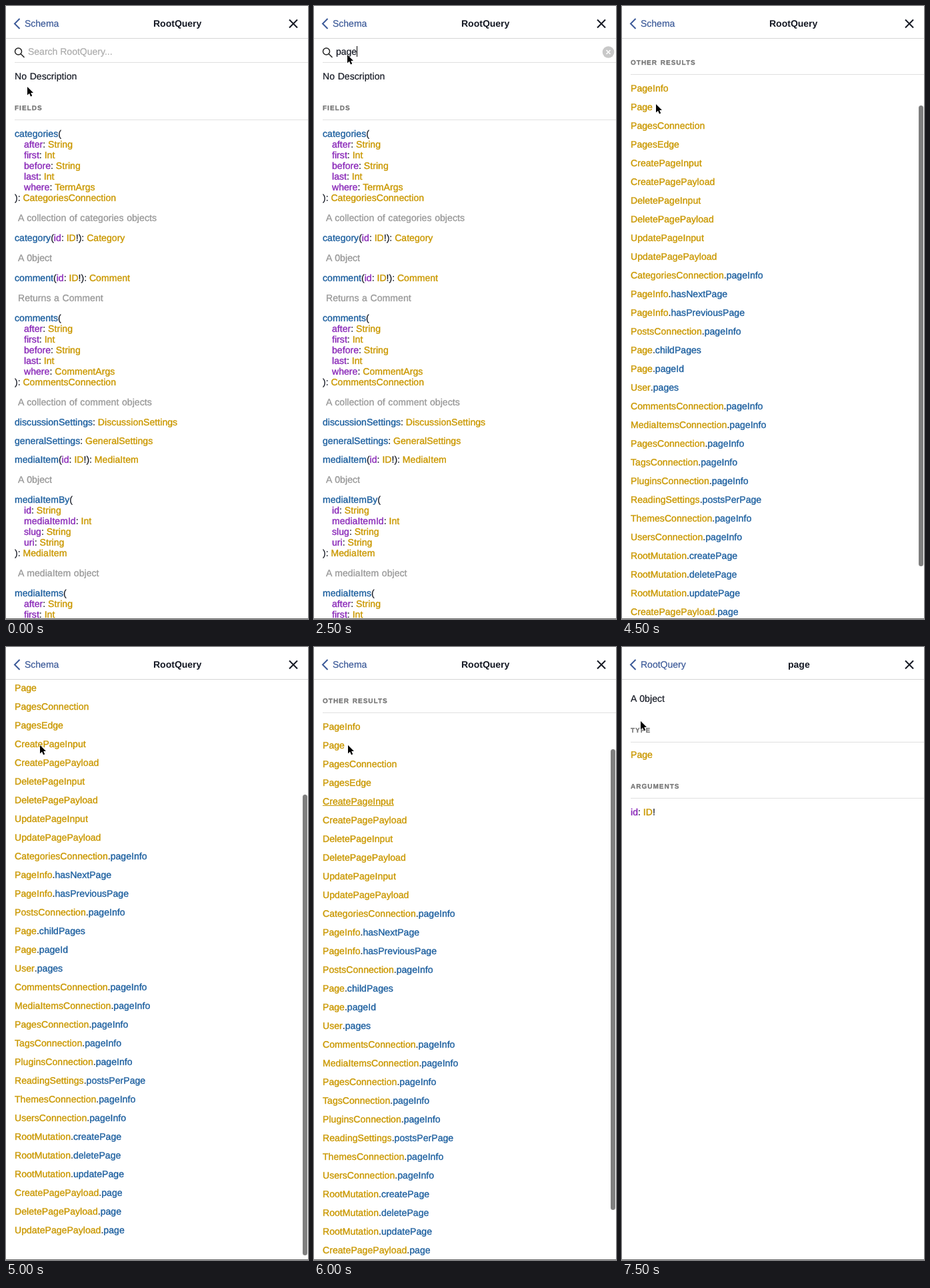
Write an HTML page that moves like this. It is 453 px wide and 918 px high and loops after 8000 ms.

```html
<!DOCTYPE html>
<html>
<head>
<meta charset="utf-8">
<style>
  html, body { margin: 0; width: 100%; height: 100%; overflow: hidden; background: #fff; }
  body { position: relative; color: #141823; font: 14px/16px "Liberation Sans", Arial, sans-serif; text-rendering: geometricPrecision; -webkit-text-stroke: .2px; }
  div, svg { position: absolute; white-space: pre; }
  svg { left: 0; top: 0; fill: none; stroke-width: 2; overflow: visible; }
  span { letter-spacing: .06px; -webkit-text-stroke: .4px; }
  .field { color: #1f61a0; }
  .arg { color: #8b2bb9; }
  .type { color: #ca9800; }
  .text { letter-spacing: .06px; word-spacing: .7px; }
  .note { color: #999; -webkit-text-stroke: .35px; }
  .head { color: #777; font: bold 10px/17px "Liberation Sans", Arial, sans-serif; letter-spacing: 1px; word-spacing: 1px; -webkit-text-stroke: .3px; }
  .rule { left: 13px; right: 0; height: 1px; background: #e0e0e0; }
  #view { inset: 0; clip-path: inset(49px 0 1px 0); }
  #content, #content > div { left: 0; top: 0; width: 100%; }
  #back { left: 28px; top: 18px; color: #3b5998; }
  #title { top: 18px; font-weight: bold; -webkit-text-stroke: 0; }
  #input { left: 33px; top: 60px; }
  #caret { top: 60px; width: 1px; height: 16px; background: #000; }
  #bar { left: 445px; width: 7px; height: 690px; border-radius: 4px; background: rgba(0, 0, 0, .5); }
</style>
</head>
<body>
<div id="view">
  <div id="content">
    <div id="search">
      <svg width="453" height="90">
        <g stroke="#222" stroke-width="1.5"><circle cx="18.5" cy="68" r="5"/><path d="M22 71.5L27.5 77"/></g>
        <g id="clear"><circle cx="441.5" cy="69" r="8.8" fill="#c8c8c8"/><path d="M438.5 66l6 6m0-6l-6 6" stroke="#fff" stroke-width="1.5"/></g>
      </svg>
      <div id="input"></div>
      <div id="caret"></div>
      <div class="rule" style="top:84px"></div>
    </div>
    <div id="fields"></div>
    <div id="results"></div>
    <div id="detail"></div>
  </div>
  <div id="bar"></div>
</div>
<div id="back"></div>
<div id="title"></div>
<div class="rule" style="left:0;top:48px;background:#d6d6d6"></div>
<div class="rule" style="left:0;top:917px;background:#666"></div>
<svg width="453" height="50">
  <path d="M20.5 19L13 26.5L20.5 34" stroke="#3b5998"/>
  <path d="M425 20.5l12 12m0-12l-12 12" stroke="#141823"/>
</svg>
<svg id="mouse" width="12" height="18"><path d="M0 0V12.5L3 9.8L5 14.5L7.2 13.5L5.2 9H9Z" fill="#000" stroke="#fff" stroke-width="1" paint-order="stroke"/></svg>
<script>
const $ = id => document.getElementById(id);
const span = cls => s => `<span class="${cls}">${s}</span>`;
const field = span('field'), arg = span('arg'), type = span('type');
const typed = s => s.replace(/(\w+): (\w+)/, (_, name, kind) => arg(name) + ': ' + type(kind));

function row(page, y, html, x = 13, cls = '') {
  $(page).insertAdjacentHTML('beforeend', `<div class="${cls}" style="left:${x}px;top:${y - 8}px">${html}</div>`);
  return $(page).lastChild;
}
function heading(page, y, label) {
  row(page, y, label, 13, 'head');
  row(page, y + 25, '', 13, 'rule');
}

// Each entry: name, arguments, type, description
const paging = 'after: String,first: Int,before: String,last: Int';
const schema = [
  ['categories', paging + ',where: TermArgs', 'CategoriesConnection', 'A collection of categories objects'],
  ['category', 'id: ID!', 'Category', 'A 0bject'],
  ['comment', 'id: ID!', 'Comment', 'Returns a Comment'],
  ['comments', paging + ',where: CommentArgs', 'CommentsConnection', 'A collection of comment objects'],
  ['discussionSettings', '', 'DiscussionSettings'],
  ['generalSettings', '', 'GeneralSettings'],
  ['mediaItem', 'id: ID!', 'MediaItem', 'A 0bject'],
  ['mediaItemBy', 'id: String,mediaItemId: Int,slug: String,uri: String', 'MediaItem', 'A mediaItem object'],
  ['mediaItems', paging, 'MediaItemsConnection']
];
row('fields', 105, 'No Description', 13, 'text');
heading('fields', 153, 'FIELDS');
let y = 191;
for (const [name, args, kind, note] of schema) {
  const list = args ? args.split(',') : [];
  if (list.length > 1) {
    row('fields', y, field(name) + '(');
    for (const a of list) row('fields', y += 16, typed(a), 27);
    row('fields', y += 16, '): ' + type(kind));
  } else {
    row('fields', y, field(name) + (args && `(${typed(args)})`) + ': ' + type(kind));
  }
  if (note) row('fields', y += 30, note, 18, 'text note');
  y += note ? 30 : 28;
}

const [pageLink] = ['page', 'pageBy', 'pages'].map((s, i) => row('results', 105 + 28 * i, field(s)));
heading('results', 209, 'OTHER RESULTS');
const matches = ('PageInfo Page PagesConnection PagesEdge CreatePageInput CreatePagePayload DeletePageInput ' +
  'DeletePagePayload UpdatePageInput UpdatePagePayload CategoriesConnection.pageInfo PageInfo.hasNextPage ' +
  'PageInfo.hasPreviousPage PostsConnection.pageInfo Page.childPages Page.pageId User.pages ' +
  'CommentsConnection.pageInfo MediaItemsConnection.pageInfo PagesConnection.pageInfo TagsConnection.pageInfo ' +
  'PluginsConnection.pageInfo ReadingSettings.postsPerPage ThemesConnection.pageInfo UsersConnection.pageInfo ' +
  'RootMutation.createPage RootMutation.deletePage RootMutation.updatePage CreatePagePayload.page ' +
  'DeletePagePayload.page UpdatePagePayload.page').split(' ').map((s, i) => {
    const [kind, name] = s.split('.');
    return row('results', 247 + 28 * i, type(kind) + (name ? '.' + field(name) : ''));
  });
const inputLink = matches[4];

row('detail', 77, 'A 0bject', 13, 'text');
heading('detail', 125, 'TYPE');
row('detail', 161, type('Page'));
heading('detail', 209, 'ARGUMENTS');
row('detail', 247, typed('id: ID!'));

// Linear interpolation through [time, value] points
function track(t, points) {
  let i = 1;
  while (i < points.length - 1 && t > points[i][0]) i++;
  const [t0, a] = points[i - 1], [t1, b] = points[i];
  return a + (b - a) * Math.min(1, Math.max(0, (t - t0) / (t1 - t0)));
}
const mouseX = [[0, 32], [1000, 50], [3500, 50], [4000, 51], [6750, 51], [7250, 28]];
const mouseY = [[0, 121], [1000, 73], [3500, 73], [4000, 147], [6750, 147], [7250, 111]];
const scroll = [[4000, 0], [4500, 124], [5000, 214], [5500, 214], [6000, 128], [6500, 0]];

const show = (id, on) => $(id).style.display = on ? 'block' : 'none';
const underline = (el, on) => el.firstChild.style.textDecoration = on ? 'underline' : 'none';

function draw(t) {
  const detail = t >= 7500;
  show('search', !detail);
  show('fields', t < 2750);
  show('results', t >= 2750 && !detail);
  show('detail', detail);

  const count = Math.round(Math.min(4, Math.max(0, (t - 1750) / 750 * 4)));
  $('input').textContent = count ? 'page'.slice(0, count) : 'Search RootQuery...';
  $('input').style.color = count ? '' : '#aaa';
  show('clear', count);

  const blinkStart = t < 2000 ? 1000 : t < 2750 ? t : 2750;
  $('caret').style.left = 33 + Math.round(count * 7.79) + 'px';
  show('caret', t >= 1000 && Math.floor((t - blinkStart) / 500) % 2 === 0);

  const offset = detail ? 0 : Math.round(track(t, scroll));
  $('content').style.transform = `translateY(${-offset}px)`;
  $('bar').style.top = 51 + Math.round(offset * .794) + 'px';
  show('bar', t >= 4250 && t < 7000);

  underline(inputLink, t >= 5500 && t < 6500);
  underline(pageLink, t >= 7250);
  $('back').textContent = detail ? 'RootQuery' : 'Schema';
  $('title').textContent = detail ? 'page' : 'RootQuery';
  $('title').style.left = detail ? '249px' : '221px';
  $('mouse').style.transform = `translate(${Math.round(track(t, mouseX))}px, ${Math.round(track(t, mouseY))}px)`;
}

// The screen updates four times a second
const start = performance.now();
function tick() {
  const t = (performance.now() - start) % 8000;
  draw(Math.floor(t / 250) * 250);
  requestAnimationFrame(tick);
}
tick();
</script>
</body>
</html>
```
